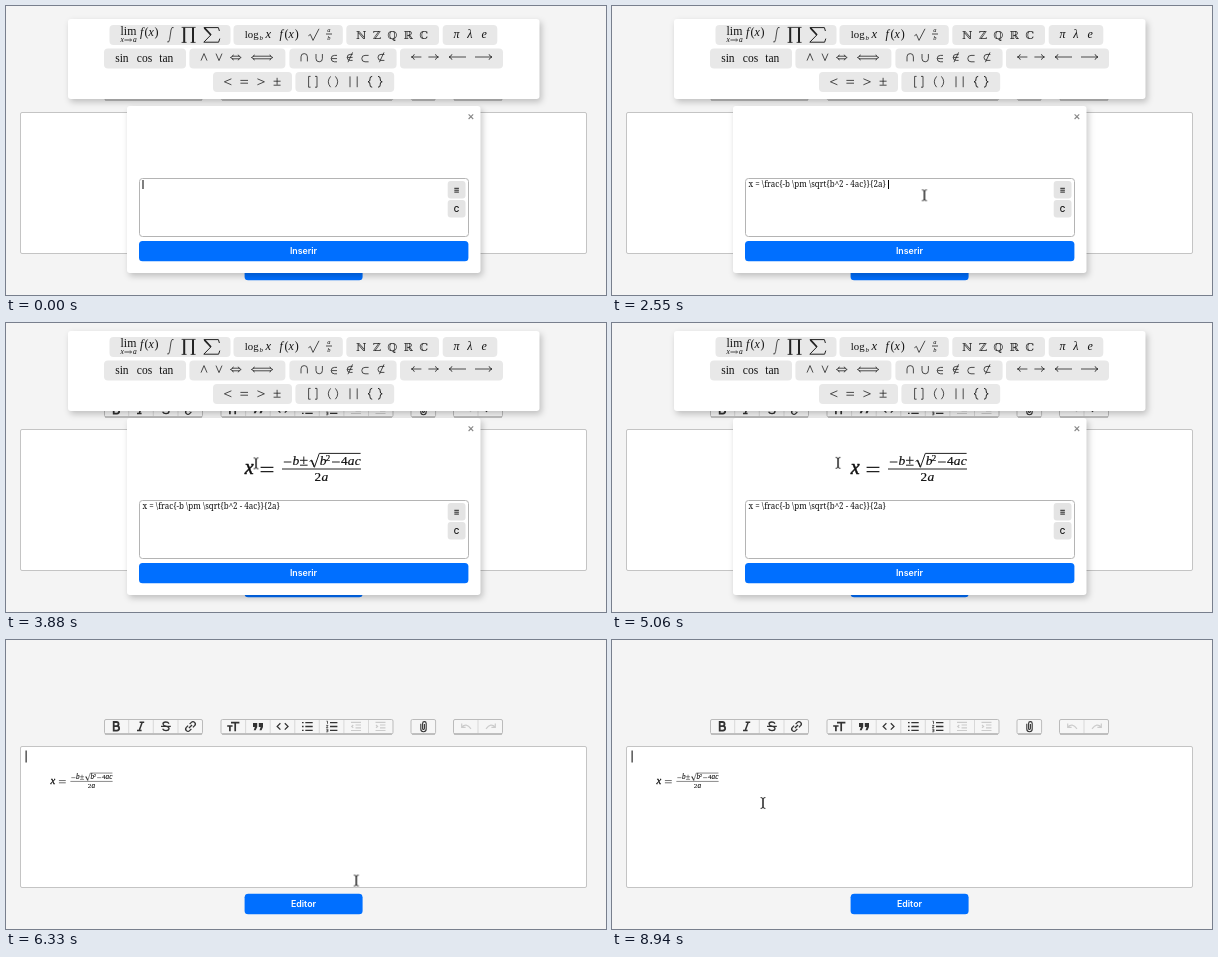
These frames come from a looping animation (600 px wide and 289 px high, 9 s). An HTML page:

```html
<!DOCTYPE html>
<html lang="pt">
<head>
<meta charset="utf-8">
<title>Editor</title>
<style>
@property --d { syntax: '<length>'; inherits: true; initial-value: 0px; }
html, body { margin: 0; width: 100%; height: 100%; overflow: hidden; background: #f4f4f4; }
svg { display: block; width: 600px; height: 289px; animation: grow 9s step-end infinite; }
text { font-family: 'Liberation Serif', 'Times New Roman', serif; fill: #111; }
.it { font-style: italic; }
.bb { font-family: 'DejaVu Serif', serif; text-anchor: middle; font-size: 11px; fill: #222; }
.label { font: 600 8.8px Inter, sans-serif; fill: #fff; text-anchor: middle; }
.key { font: 600 7.5px Inter, sans-serif; text-anchor: middle; }
.line { fill: none; stroke: #222; stroke-width: .8; }
.icon { fill: none; stroke: #333; stroke-width: 1.3; }
.pale { fill: none; stroke: #ccc; stroke-width: 1.2; }
.solid { fill: #333; stroke: none; }
.card { fill: #fff; filter: drop-shadow(2px 3px 3px rgba(0,0,0,.22)); }
.pills rect { height: 20px; rx: 4px; fill: #e8e8e8; }
.tex text { stroke: #111; stroke-width: .2; }
.up { transform: translateY(calc(-1 * var(--d))); }
.down { transform: translateY(var(--d)); }
.box { y: calc(100px - var(--d)); height: calc(167px + 2 * var(--d)); }
.blue { fill: #006fff; }
#code { font: 8px 'Noto Serif', serif; }

.anim, #cur g { animation: 9s step-end infinite; }
#ui { animation-name: ui; }
#code { animation-name: code; }
#draft { animation-name: draft; }
#final { animation-name: final; }
#result { animation-name: result; }
#caretA { animation-name: caretA; }
#caretB { animation-name: caretB; }
#caretC { animation-name: caretC; }
#insert { animation-name: hover; }
#cur { animation: move 9s linear infinite; }
#cur .arrow { animation-name: arrow; }
#cur .beam { animation-name: beam; }
#cur .hand { animation-name: hand; }

@keyframes grow { 0%, 100% { --d: 0px } 29.62% { --d: 17px } 33.28% { --d: 5px } }
@keyframes ui { 0% { opacity: 1 } 65.95%, 100% { opacity: 0 } }
@keyframes code { 0% { opacity: 0 } 28.28%, 100% { opacity: 1 } }
@keyframes draft { 0% { opacity: 0 } 29.62% { opacity: 1 } 33.28%, 100% { opacity: 0 } }
@keyframes final { 0% { opacity: 0 } 33.28%, 100% { opacity: 1 } }
@keyframes result { 0% { opacity: 0 } 66.6%, 100% { opacity: 1 } }
@keyframes caretA { 0%, 17.8% { opacity: 1 } 12.2%, 22.8%, 100% { opacity: 0 } }
@keyframes caretB { 0% { opacity: 0 } 28.28% { opacity: 1 } 33.28%, 100% { opacity: 0 } }
@keyframes caretC { 0%, 81.39% { opacity: 0 } 65.95%, 94.94%, 100% { opacity: 1 } }
@keyframes hover { 0% { fill: #006fff } 63.9%, 100% { fill: #2584ff } }
@keyframes arrow { 0%, 8.1% { opacity: 0 } 7.39%, 77% { opacity: 1 } 95.6%, 100% { opacity: 0 } }
@keyframes beam { 0%, 63.9%, 77% { opacity: 0 } 8.1%, 65.95%, 95.6%, 100% { opacity: 1 } }
@keyframes hand { 0% { opacity: 0 } 63.9% { opacity: 1 } 65.95%, 100% { opacity: 0 } }
@keyframes move {
  0%, 7.4% { transform: translate(370px, 278px) }
  8.2% { transform: translate(345px, 215px) }
  10% { transform: translate(330px, 165px) }
  11.7% { transform: translate(312px, 159px) }
  13.6% { transform: translate(306px, 180px) }
  15.4%, 15.9% { transform: translate(314px, 198px) }
  17.2% { transform: translate(313px, 191px) }
  18.5%, 38.2% { transform: translate(312.4px, 189.3px) }
  39.6% { transform: translate(354px, 165px) }
  41.1% { transform: translate(310px, 135px) }
  43.1% { transform: translate(250.5px, 140px) }
  44.7% { transform: translate(219px, 165px) }
  46.3% { transform: translate(265px, 215px) }
  48.1% { transform: translate(313px, 196px) }
  49.4% { transform: translate(300px, 150px) }
  51% { transform: translate(255px, 128px) }
  52.5%, 55.4% { transform: translate(214px, 150px) }
  57.2% { transform: translate(240px, 128px) }
  59.4% { transform: translate(320px, 135px) }
  61.7% { transform: translate(350px, 180px) }
  63.9% { transform: translate(352px, 240px) }
  65.3%, 70.2% { transform: translate(355px, 246px) }
  72.2% { transform: translate(290px, 170px) }
  73.8% { transform: translate(180px, 110px) }
  75.1% { transform: translate(70px, 108px) }
  76.1% { transform: translate(41px, 125px) }
  77.3% { transform: translate(60px, 150px) }
  79.1%, 88.1% { transform: translate(115px, 144px) }
  88.9%, 94.9% { transform: translate(115.3px, 144.2px) }
  99.3%, 100% { transform: translate(151px, 163px) }
}
</style>
</head>
<body>
<svg viewBox="0 0 600 289">
  <defs>
    <path id="left" d="M3 -2.8Q2.3 -.6 0 0Q2.3 .6 3 2.8"/>
    <path id="right" d="M-3 -2.8Q-2.3 -.6 0 0Q-2.3 .6 -3 2.8"/>
    <g id="formula" class="tex">
      <text class="it" x="238.8" y="151.2" font-size="20" style="stroke-width:.5">x</text>
      <g class="it" font-size="13.5">
        <text x="286.4 313.8 341.8 348.8" y="142.4">bbac</text>
        <text x="315.6" y="158.2">a</text>
      </g>
      <text x="335" y="142.4" font-size="13.2">4</text>
      <text x="308.6" y="158.2" font-size="13.2">2</text>
      <text x="319.8" y="138" font-size="9">2</text>
      <g class="line">
        <path stroke-width="1.2" d="M254.6 144.4h12.8M254.6 148.6h12.8"/>
        <path stroke-width="1" d="M276 146h79M277.8 139h7.6M294 137.3h7.6M297.8 133.5v7.6M294 142.2h7.6M326 139h7.8M303.6 138.4l2-1.3 2.8 7.2L313.3 130.4H354.6"/>
        <path stroke-width="1.5" d="M305.4 137.2l3 6.6"/>
      </g>
    </g>
  </defs>

  <!-- page -->
  <g fill="#f6f6f6" stroke="#bbb">
    <rect x="98.5" y="79.5" width="98" height="14.4" rx="1.5"/>
    <rect x="215" y="79.5" width="172" height="14.4" rx="1.5"/>
    <rect x="405" y="79.5" width="24.6" height="14.4" rx="1.5"/>
    <rect x="447.5" y="79.5" width="49" height="14.4" rx="1.5"/>
    <path stroke="#ccc" stroke-width=".7" d="M122.7 80v13.5M147.3 80v13.5M172 80v13.5M239.6 80v13.5M264.2 80v13.5M288.8 80v13.5M313.3 80v13.5M337.9 80v13.5M362.5 80v13.5M472 80v13.5"/>
    <path stroke="#999" stroke-width=".8" d="M99 94.1h97M216 94.1h170M406 94.1h23M448 94.1h48"/>
  </g>
  <g class="icon">
    <path stroke-width="1.8" d="M107.7 82v8.6h3.2a2.1 2.1 0 0 0 0-4.5h-3.2h2.8a2 2 0 0 0 0-4.1z"/>
    <path stroke-width="1.5" d="M133.6 82.2h4.6M131 90.6h4.6M136.2 82.2l-3 8.4"/>
    <path d="M163 83.6q-1-1.7-3.3-1.6q-2.8.2-2.7 2q.2 1.5 3 2.2q3 .7 3 2.4q-.2 1.9-3 2q-2.6 0-3.4-1.8M155 86.4h9.8"/>
    <path transform="rotate(-45 184.5 86.5)" d="M183.4 84.2h-2.4a2.3 2.3 0 0 0 0 4.6h2.4M185.6 84.2h2.4a2.3 2.3 0 0 1 0 4.6h-2.4M182.3 86.5h4.4"/>
    <path stroke-width="1.7" d="M225 82.7h8.4M229.2 82.7v8.6M221.2 86h5.4M223.9 86v5.3"/>
    <path class="solid" d="M247 83h4.2v4l-1.5 3.2h-2l1.2-3.1H247zM252.8 83h4.2v4l-1.5 3.2h-2l1.2-3.1h-1.9z"/>
    <path d="M274.4 83.2l-3.2 3.2 3.2 3.2M278.8 83.2l3.2 3.2-3.2 3.2"/>
    <path d="M299.3 82.6h7.4M299.3 86.5h7.4M299.3 90.4h7.4M324 82.6h7.4M324 86.5h7.4M324 90.4h7.4M296 82.6h1.6M296 86.5h1.6M296 90.4h1.6"/>
    <path stroke-width=".8" d="M320.5 81.2h1v2.6M320.2 85.4h1.8l-1.6 2.2h1.8M320.2 89.2h1.7v2.6h-1.7M320.6 90.5h1.2"/>
    <path stroke-width="1.1" d="M414.8 83.8v5.2a2.7 2.7 0 0 0 5.4 0v-5.6a1.8 1.8 0 0 0-3.6 0v5.2a.9.9 0 0 0 1.8 0v-4.6"/>
  </g>
  <g class="pale">
    <path d="M345 82.3h10M349.5 85h5.5M349.5 87.8h5.5M345 90.5h10M347.3 85l-1.6 1.4 1.6 1.4M369.5 82.3h10M374 85h5.5M374 87.8h5.5M369.5 90.5h10M370 85l1.6 1.4-1.6 1.4"/>
    <path d="M455.7 83.4v3.9h3.9M456 87q4-4.6 9 1.8M489.3 83.4v3.9h-3.9M489 87q-4-4.6-9 1.8"/>
  </g>
  <rect x="14.5" y="106.5" width="566" height="141" rx="1.5" fill="#fff" stroke="#c4c4c4"/>
  <rect class="blue" x="238.6" y="253.8" width="118" height="20.4" rx="3.5"/>
  <text class="label" x="297.5" y="267.2">Editor</text>
  <g id="result" class="anim"><use href="#formula" transform="translate(-83.3 63.3) scale(.535)"/></g>
  <rect id="caretC" class="anim" x="19.6" y="110.5" width="1" height="12"/>

  <g id="ui" class="anim">
    <path class="icon" d="M489.3 83.4v3.9h-3.9M489 87q-4-4.6-9 1.8"/>

    <!-- symbol palette -->
    <g class="up">
      <rect class="card" x="62" y="13" width="471.5" height="80" rx="3"/>
      <g class="pills">
        <rect x="103.5" y="19" width="121"/><rect x="227.5" y="19" width="109.3"/>
        <rect x="340.3" y="19" width="92.7"/><rect x="436.7" y="19" width="54.6"/>
        <rect x="98" y="42.4" width="82"/><rect x="183.4" y="42.4" width="96"/>
        <rect x="283.4" y="42.4" width="107.2"/><rect x="394" y="42.4" width="103"/>
        <rect x="207" y="66" width="79"/><rect x="289.4" y="66" width="98.8"/>
      </g>
      <g>
        <text x="114.6" y="28.6" font-size="11.8">lim</text>
        <text class="it" x="114.4 127" y="36" font-size="7.5">xa</text>
        <text x="134 138.6 142.6 148.6" y="29.6" font-size="12"><tspan class="it">f</tspan>(<tspan class="it">x</tspan>)</text>
        <text x="238.8" y="32" font-size="10.8">log</text>
        <text class="it" x="253.6" y="34" font-size="7">b</text>
        <text class="it" x="259.4" y="32" font-size="12.5">x</text>
        <text x="273.6 278.4 282.6 288.8" y="32" font-size="12"><tspan class="it">f</tspan>(<tspan class="it">x</tspan>)</text>
        <text class="it" x="321.2" y="26" font-size="6.5">a</text>
        <text class="it" x="321.2" y="34.4" font-size="6.5">b</text>
        <text class="it" x="447.6 461.2 475.4" y="32" font-size="12">πλe</text>
        <g font-size="11.5">
          <text x="109.2" y="55.6">sin</text>
          <text x="130.8" y="55.6">cos</text>
          <text x="153.2" y="55.6">tan</text>
        </g>
      </g>
      <g class="line">
        <path d="M118.4 34h7M320 28h6"/>
        <use href="#right" transform="translate(125.8 34) scale(.6)"/>
        <path d="M167.6 21.6q-1.8-1.4-2.6 2.4l-1.4 9.4q-.8 4-2.4 2.4"/>
        <path d="M175.6 21.4h14M175.6 36.4h5M184.6 36.4h5"/>
        <path stroke-width="2" d="M178.2 21.4v15M187 21.4v15"/>
        <path stroke-width="1" d="M213.4 25l-1-3.4H198l6.8 7.4-7 7.2h14.8l1.2-3.6"/>
        <path stroke-width="1.8" d="M198.4 21.8l6.6 7.2"/>
        <path d="M302.4 29.8l2-1.4 2.6 6L313 22.8"/>
        <path d="M195 54.6l3-7 3 7M210 47.6l3 7 3-7"/>
        <path d="M226 50.2h7.6M226 52.8h7.6M247 50.2h18M247 52.8h18"/>
        <use href="#left" x="224.4" y="51.5"/><use href="#right" x="235.2" y="51.5"/>
        <use href="#left" x="245.4" y="51.5"/><use href="#right" x="266.8" y="51.5"/>
        <path d="M405.4 51h10M422.4 51h10M443 51h17M469 51h17"/>
        <use href="#left" x="405.4" y="51"/><use href="#right" x="432.4" y="51"/>
        <use href="#left" x="443" y="51"/><use href="#right" x="486" y="51"/>
        <path d="M295 55.4v-4.6a3.2 3.2 0 0 1 6.4 0v4.6M310 48v4.6a3.2 3.2 0 0 0 6.4 0v-4.6"/>
        <path d="M331 49.4h-2.6a3.1 3.1 0 0 0 0 6.4h2.6M325.4 52.6h5.6M346.6 48.4h-2.4a3 3 0 0 0 0 6h2.4M341.2 51.4h5.4M346.6 46.4l-4.6 9.8"/>
        <path d="M362.6 49.4h-3.6a3.1 3.1 0 0 0 0 6.4h3.6M378.4 48.4h-3.4a3 3 0 0 0 0 6h3.4M378 46.4l-4.6 9.8"/>
        <path d="M225.4 72.8l-7 3 7 3M234.4 74.4h7.6M234.4 77.2h7.6M251.4 72.8l7 3-7 3M267.6 75.2h7M271.1 71.8v7M267.6 79.2h7"/>
        <path d="M304.6 70.4h-2v10.8h2M309 70.4h2v10.8h-2M324.6 70.4q-4.6 5.4 0 10.8M329.4 70.4q4.6 5.4 0 10.8M344 70.4v10.8M351.2 70.4v10.8"/>
        <path stroke-width="1" d="M366.2 70.4q-2.4 0-2.2 2.4q.4 2.8-2 3q2.4.2 2 3q-.2 2.4 2.2 2.4M372 70.4q2.4 0 2.2 2.4q-.4 2.8 2 3q-2.4.2-2 3q.2 2.4-2.2 2.4"/>
      </g>
      <text class="bb" x="355.4 371 386.4 402.2 418" y="32.6">ℕℤℚℝℂ</text>
    </g>

    <!-- formula dialog -->
    <rect class="card box" x="121" width="353.5" rx="3"/>
    <path class="up" fill="none" stroke="#888" stroke-width="1.1" d="M462.6 108.4l4.6 4.6M467.2 108.4l-4.6 4.6"/>
    <g class="down">
      <rect x="133.5" y="172.5" width="329" height="58" rx="3" fill="#fff" stroke="#b4b4b4"/>
      <rect x="441.7" y="175" width="17.8" height="17.4" rx="3" fill="#e4e4e4"/>
      <rect x="441.7" y="194" width="17.8" height="17.4" rx="3" fill="#e4e4e4"/>
      <path fill="none" stroke="#222" d="M448.3 182.3h4.6M448.3 184.2h4.6M448.3 186.1h4.6"/>
      <text class="key" x="450.6" y="205.7">C</text>
      <text id="code" class="anim" x="136.6" y="180.6">x = \frac{-b \pm \sqrt{b^2 - 4ac}}{2a}</text>
      <rect id="caretA" class="anim" x="136.5" y="174" width="1" height="9"/>
      <rect id="caretB" class="anim" x="276" y="174" width="1" height="9"/>
      <rect id="insert" class="anim" x="133" y="235" width="329.4" height="20.2" rx="3.5"/>
      <text class="label" x="297.5" y="248.2">Inserir</text>
    </g>
    <g id="draft" class="anim tex">
      <text class="it" x="235.2" y="157.4" font-size="20">x</text>
      <g class="it" font-size="14.4">
        <text x="279.2 311.2 344.8 351.8" y="136.4">bbac</text>
        <text x="312.4" y="167.2">a</text>
      </g>
      <text x="337.4" y="136.4" font-size="14.4">4</text>
      <text x="305" y="167.2" font-size="14.4">2</text>
      <text x="319" y="131" font-size="11">2</text>
      <g class="line">
        <path stroke-width="1.1" d="M249.8 150.7h9.4M249.8 154.7h9.4M268 151.6h90.4M269.8 132.6h7M289 131.4h7.4M292.7 127.8v7.2M289 136.2h7.4M328 132.6h7.4M299.4 134l2.2-1.2 3.6 9.6L311.2 119.6H358.4"/>
        <path stroke-width="1.6" d="M301.4 133l3.6 9"/>
      </g>
    </g>
    <g id="final" class="anim"><use href="#formula"/></g>
  </g>

  <g id="cur">
    <g class="arrow"><path d="M0 0v10.4l2.4-2.2 1.8 4.2 1.8-.8-1.8-4h3.2z" stroke="#fff" stroke-width=".6"/></g>
    <g class="beam" fill="none">
      <path stroke="#fff" stroke-width="2" opacity=".7" d="M-2.4 -5.4Q0 -5.4 0 -4V4Q0 5.4 -2.4 5.4M2.4 -5.4Q0 -5.4 0 -4V4Q0 5.4 2.4 5.4"/>
      <path stroke="#222" d="M-2.4 -5.4Q0 -5.4 0 -4V4Q0 5.4 -2.4 5.4M2.4 -5.4Q0 -5.4 0 -4V4Q0 5.4 2.4 5.4"/>
    </g>
    <g class="hand"><path transform="scale(.9)" d="M-1.2 0q1-1 1.9 0v3.2q2.8 0 4.6 1.2q.8 2.6-.8 5.2h-5.4q-1.6-2.4-3.8-4.4q.4-1.6 2.2-.4l1.3 1z" stroke="#fff" stroke-width=".5"/></g>
  </g>
</svg>
</body>
</html>
```
